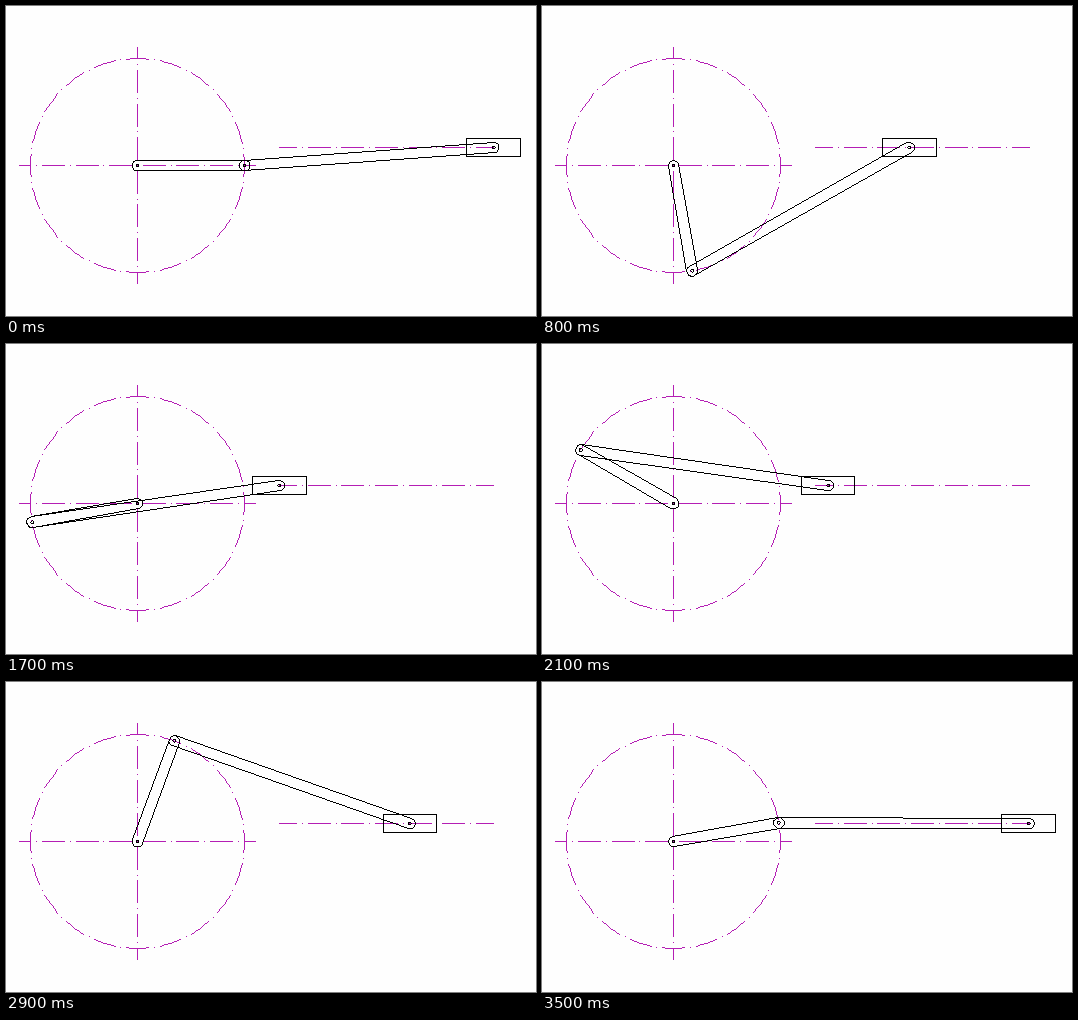
Write an HTML page with a canvas that moves like this. It is 530 by 310 pixels and loops after 3600 ms.

```html
<!DOCTYPE html>
<html lang="en">
<head>
<meta charset="utf-8">
<title>Offset slider-crank</title>
<style>
html, body { margin: 0; width: 100%; height: 100%; overflow: hidden; background: #fefefe; }
canvas { display: block; }
</style>
</head>
<body>
<canvas id="stage" width="530" height="310"></canvas>
<script>
const LOOP = 3600, STEP = 100, TAU = 2 * Math.PI;
const CX = 131.5, CY = 159.5, CRANK = 107;
const SLIDE_Y = 141.5, ROD = 249.84, HALF = 5.3;
const BLOCK_W = 53.5, BLOCK_H = 18, HOLE = 1.45;
const PERIOD = 33.6, DASH = 22;
const INK = "#000", AXIS = "#b41eb4", PAPER = "#fefefe";
const ctx = document.getElementById("stage").getContext("2d");

// One-pixel line without antialiasing.
function line(x0, y0, x1, y1) {
  x0 = Math.floor(x0); y0 = Math.floor(y0);
  const dx = Math.floor(x1) - x0, dy = Math.floor(y1) - y0;
  const n = Math.max(Math.abs(dx), Math.abs(dy));
  for (let i = 0; i <= n; i++) {
    const t = n ? i / n : 0;
    ctx.fillRect(Math.round(x0 + dx * t), Math.round(y0 + dy * t), 1, 1);
  }
}

function polyline(points) {
  for (let i = 1; i < points.length; i++) line(...points[i - 1], ...points[i]);
}

function arc(x, y, r, from, to, parts) {
  return Array.from({ length: parts + 1 }, (_, i) => {
    const a = from + (to - from) * i / parts;
    return [x + r * Math.cos(a), y + r * Math.sin(a)];
  });
}

function ring(x, y, r) {
  polyline(arc(x, y, r, 0, TAU, 8));
}

// Bar with round ends around both joints.
function link(x0, y0, x1, y1) {
  const a = Math.atan2(y1 - y0, x1 - x0), q = TAU / 4;
  const near = arc(x0, y0, HALF, a + q, a + 3 * q, 8);
  const far = arc(x1, y1, HALF, a - q, a + q, 8);
  polyline([...near, ...far, near[0]]);
}

// Dash-dot pattern, symmetric about zero within [-half, half].
function dashDot(half, shift, stroke) {
  const clip = v => Math.max(-half, Math.min(half, v));
  const last = Math.ceil(half / PERIOD) + 1;
  for (let k = -last; k <= last; k++) {
    const mid = k * PERIOD + shift, dot = mid + PERIOD / 2;
    const a = clip(mid - DASH / 2), b = clip(mid + DASH / 2);
    if (b > a) stroke(a, b);
    if (Math.abs(dot) < half) stroke(dot, dot);
  }
}

function drawAxes() {
  ctx.fillStyle = AXIS;
  dashDot(118.4, PERIOD / 2, (a, b) => {
    line(CX + a, CY, CX + b, CY);
    line(CX, CY + a, CX, CY + b);
  });
  dashDot(107, 0, (a, b) => line(380.5 + a, SLIDE_Y, 380.5 + b, SLIDE_Y));
  dashDot(CRANK * Math.PI, 0, (a, b) =>
    polyline(arc(CX, CY, CRANK, a / CRANK, b / CRANK, 4)));
}

function drawBlock(x) {
  const l = x - BLOCK_W / 2, r = x + BLOCK_W / 2;
  const t = SLIDE_Y - BLOCK_H / 2, b = SLIDE_Y + BLOCK_H / 2;
  polyline([[l, t], [r, t], [r, b], [l, b], [l, t]]);
}

function draw(ms) {
  const a = Math.floor((ms % LOOP) / STEP) * STEP / LOOP * TAU;
  const px = CX + CRANK * Math.cos(a), py = CY + CRANK * Math.sin(a);
  const sx = px + Math.sqrt(ROD ** 2 - (SLIDE_Y - py) ** 2);
  ctx.fillStyle = PAPER;
  ctx.fillRect(0, 0, 530, 310);
  drawAxes();
  ctx.fillStyle = INK;
  link(CX, CY, px, py);
  link(px, py, sx, SLIDE_Y);
  drawBlock(sx);
  ring(CX, CY, HOLE);
  ring(px, py, HOLE);
  ring(sx, SLIDE_Y, HOLE);
}

const start = performance.now();
function tick(now) {
  draw(Math.max(0, now - start));
  requestAnimationFrame(tick);
}
draw(0);
requestAnimationFrame(tick);
</script>
</body>
</html>
```
